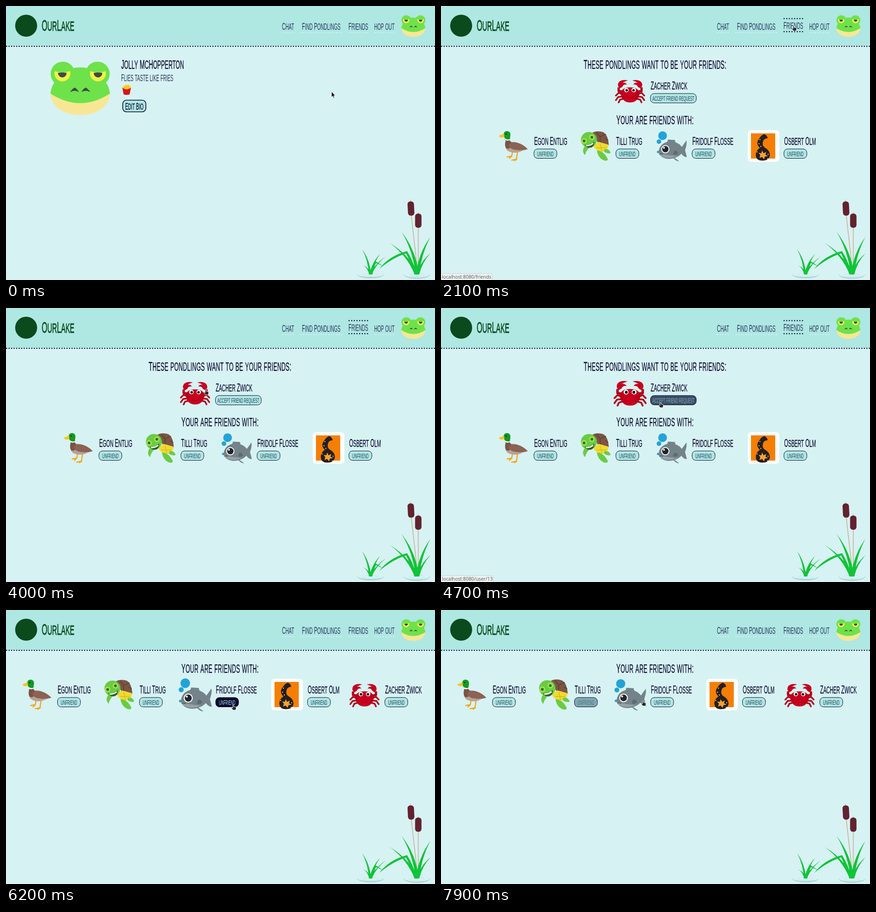
An HTML page for the animation above (8000 ms loop, 937 by 598 pixels).

```html
<!DOCTYPE html>
<html lang="en">
<head>
<meta charset="utf-8">
<title>OurLake</title>
<style>
  @property --zoom { syntax: "<number>"; inherits: true; initial-value: 0; }
  @property --tint { syntax: "<number>"; inherits: true; initial-value: 0; }

  :root { --navy: #07072f; --aqua: #afe7e2; --pale: #d7f2f3; }
  html, body { margin: 0; width: 100%; height: 100%; overflow: hidden; background: var(--pale); }
  svg { display: block; width: 937px; height: 598px; }

  text { font-family: "Liberation Sans", Arial, sans-serif; fill: #24345a; }
  .bold { fill: var(--navy); stroke: var(--navy); stroke-width: .25; }
  .title { letter-spacing: .022em; }
  .brand { fill: #0b4a1c; stroke: #0b4a1c; stroke-width: .8; }
  .status text { font: 10.4px "Open Sans", sans-serif; fill: #555; }
  .dots { fill: none; stroke-linecap: round; stroke: var(--pale); }
  .dark { stroke: var(--navy); }

  .page, .status, .pointer, .friends, .friends .top, .card, .cursor {
    animation: 8s linear infinite;
  }
  .page, .pointer { visibility: hidden; animation-timing-function: step-end; }
  .profile { animation-name: profile; }
  .requests { animation-name: requests; }
  .accepted { animation-name: accepted; }
  @keyframes profile { 0% { visibility: visible } 22.5% { visibility: hidden } }
  @keyframes requests { 0% { visibility: hidden } 22.5% { visibility: visible } 73.75% { visibility: hidden } }
  @keyframes accepted { 0% { visibility: hidden } 73.75%, 100% { visibility: visible } }

  .friends { animation-name: lift; }
  .friends .top { animation-name: top; }
  .friends .low { stroke: color-mix(in srgb, var(--navy) calc(100% * var(--tint)), var(--pale)); }
  @keyframes lift {
    0%, 14.5% { --tint: 0; transform: none }
    19.5%, 73.75% { --tint: 1; transform: translateY(-2px) }
    77%, 100% { --tint: 0; transform: none }
  }
  @keyframes top { 0%, 22% { opacity: 0 } 26.25%, 73.75% { opacity: 1 } 77%, 100% { opacity: 0 } }

  .link { animation-name: link; }
  .user { animation-name: user; }
  @keyframes link { 0%, 14.9% { opacity: 0 } 15%, 36% { opacity: 1 } 39.5%, 100% { opacity: 0 } }
  @keyframes user { 0%, 53.7% { opacity: 0 } 53.8%, 60% { opacity: 1 } 63%, 100% { opacity: 0 } }

  .avatar { transform: scale(calc(1 + .1 * var(--zoom))); }
  .button rect { fill: color-mix(in srgb, var(--navy) calc(100% * var(--tint)), var(--aqua)); stroke: var(--navy); }
  .button text { fill: color-mix(in srgb, var(--aqua) calc(100% * var(--tint)), #24425f); }
  .asking { animation-name: asking; }
  .fishy { animation-name: fishy; }
  .shelly { animation-name: shelly; }
  @keyframes asking {
    0%, 51.25% { --zoom: 0; --tint: 0 }
    55%, 56.25% { --zoom: 1; --tint: 0 }
    58.75% { --zoom: 1; --tint: .68 }
    61.25%, 100% { --zoom: 1; --tint: 1 }
  }
  @keyframes fishy {
    0%, 73.75% { --zoom: 0; --tint: 0 }
    77.5%, 89.4% { --zoom: 1; --tint: 1 }
    91.25% { --zoom: 1; --tint: .5 }
    93.1% { --zoom: .5; --tint: 0 }
    95%, 96.9% { --zoom: 0; --tint: 0 }
    98.75% { --zoom: .5; --tint: 0 }
    100% { --zoom: .8; --tint: 0 }
  }
  @keyframes shelly {
    0%, 93% { --zoom: 0; --tint: 0 }
    96.5% { --zoom: .75; --tint: .75 }
    98.75% { --zoom: .28; --tint: .28 }
    100% { --zoom: .1; --tint: .1 }
  }

  .cursor { animation-name: move; animation-timing-function: ease-in-out; }
  @keyframes move {
    0%, 4% { transform: translate(711px, 187px) }
    15%, 33% { transform: translate(770px, 43px) }
    40%, 44% { transform: translate(493px, 127px) }
    50% { transform: translate(436px, 178px) }
    55% { transform: translate(440px, 202px) }
    58.75% { transform: translate(479px, 206px) }
    63.5%, 88.2% { transform: translate(496px, 207px) }
    95%, 96.25% { transform: translate(325px, 203px) }
    98.75% { transform: translate(441px, 198px) }
    100% { transform: translate(448px, 198px) }
  }
  .arrow { animation-name: arrow; }
  .hand { animation-name: hand; }
  .beam { animation-name: beam; }
  @keyframes arrow {
    0% { visibility: visible } 14.4% { visibility: hidden }
    34.5% { visibility: visible } 39% { visibility: hidden }
    45.5% { visibility: visible } 49.5% { visibility: hidden }
  }
  @keyframes hand {
    0% { visibility: hidden } 14.4% { visibility: visible }
    34.5% { visibility: hidden } 49.5%, 100% { visibility: visible }
  }
  @keyframes beam { 0% { visibility: hidden } 39% { visibility: visible } 45.5% { visibility: hidden } }
</style>
</head>
<body>
<svg id="stage" viewBox="0 0 937 598">
  <defs>
    <g id="eye">
      <circle cx="27" cy="27" r="26.5" fill="#6ee24a"/>
      <path d="M9.5 21Q26 27 43 21A17.5 17.5 0 1 1 9.5 21Z" fill="#edf545"/>
      <path d="M16.5 25q9.5-2 19 0a9.5 10 0 0 1-19 0" fill="#3f494c"/>
      <path d="M43 67Q47 60 53 57Q59 60 62 67Q53 61 43 67Z" fill="#3f494c"/>
    </g>
    <g id="frog">
      <path d="M0 68C0 97 27 117 65 117S130 97 130 68Z" fill="#f7e794"/>
      <path d="M0 70C2 55 8 42 22 32Q37 13 65 13T108 32C122 42 128 55 130 70Q65 112 0 70Z" fill="#6ee24a"/>
      <use href="#eye"/><use href="#eye" transform="translate(130) scale(-1 1)"/>
    </g>

    <g id="duck">
      <g fill="none" stroke="#f5a51b" stroke-width="2.5" stroke-linecap="round" stroke-linejoin="round">
        <path d="M-2 11L-4 22L-14 24M-9 27L-4 22"/><path d="M9 12L6 29L-4 31M2 32L7 29"/>
      </g>
      <path d="M-17-12Q-21 5-12 11Q4 19 20 10L31 7Q15-8-8-10Z" fill="#b9a294"/>
      <path d="M-17-13L-9-14Q-6-7-2-6L-8 4Q-12 8-17 4Q-20-3-17-13Z" fill="#795345"/>
      <path d="M-11-2Q-5-11 9-7Q22-3 31 7Q19 10 8 9Q-8 8-11-2Z" fill="#8b6254"/>
      <path d="M-18-14Q-13-11-8-14" stroke="#fff" stroke-width="2" fill="none"/>
      <path d="M-22-25Q-21-33-14-32.500Q-6-32-7-23L-8-15Q-13-13-18-16Q-22-20-22-25Z" fill="#129a22"/>
      <path d="M-21-27Q-25-25-31-23Q-33-20-29-19Q-23-17-20-21Z" fill="#f8c51c"/>
      <circle cx="-16" cy="-26" r="1.3" fill="#111"/>
    </g>

    <g id="turtle">
      <path d="M-8-28Q0-34 14-31Q27-28 29-2Q18 2 8-3Z" fill="#7b5645"/>
      <path d="M2-30L10-20L10-7M10-20L23-26M21-16L28-12" stroke="#55382b" fill="none" stroke-width="1.3"/>
      <path d="M-5 0L7-9L28-3Q28 10 15 13Q1 12-5 0Z" fill="#f2d92f"/>
      <path d="M2 4L24 4M10-5L14 12" stroke="#b9b52b" fill="none"/>
      <path d="M-24 1L-14 4Q-20 9-23 20Q-31 12-24 1ZM3 10Q18 10 27 29Q26 34 17 31Q5 25 3 10ZM19 7Q30 5 33 15Q29 18 19 13Z" fill="#69cc42"/>
      <ellipse cx="-14.5" cy="-13.5" rx="17.500" ry="17" fill="#69cc42"/>
      <g fill="#a4e34c"><circle cx="-25" cy="-11" r="6"/><circle cx="-8" cy="-19" r="6"/></g>
      <circle cx="-25" cy="-11" r="3" fill="#346a2b"/><circle cx="-8" cy="-19" r="3" fill="#346a2b"/>
      <path d="M-24-3Q-11 0-3-10Q-2 4-14 4Q-21 3-24-3Z" fill="#315f27"/>
      <path d="M-21-1Q-12 0-5-6" stroke="#fff" stroke-width="2.5" fill="none"/>
    </g>

    <g id="fish">
      <g fill="#22a3d8"><circle cx="-20" cy="-22.5" r="9.5"/><circle cx="-28" cy="-9.5" r="5"/><circle cx="-30" cy="13" r="2.5"/></g>
      <path d="M-10-9L-8-14L7-13L8-8Q17-5 22 2L32-12Q34-5 29 9L33 24Q27 25 21 17Q14 24 6 26L16 33Q10 34 4 27Q-20 32-29 15Q-28-4-10-9Z" fill="#748389"/>
      <path d="M-29 15Q-14 20 12 22Q-18 33-29 15Z" fill="#94a3a8"/>
      <path d="M5 11Q11 9 14 16Q9 21 3 18" fill="#5d6c72"/>
      <circle cx="-14" cy="7" r="9" fill="#fff"/><circle cx="-14" cy="7" r="7" fill="#202629"/><circle cx="-17" cy="4" r="2" fill="#fff"/>
      <path d="M-27 18Q-22 16-19 19" stroke="#47545a" stroke-width="1.5" fill="none"/>
    </g>

    <g id="eel">
      <rect x="-34.5" y="-34.5" width="69" height="69" rx="7" fill="#fff"/>
      <rect x="-27.5" y="-27.5" width="53" height="55" fill="#f57f05"/>
      <path d="M9-17Q8-23 2-26Q-5-24-9-17Q-15-10-13-3Q-11 2-8 4Q-17 10-17 20Q-16 32-3 32Q13 32 14 19Q13 9 2 3Q-4-2-1-10Q0-16 9-17Z" fill="#241f20"/>
      <path d="M-3 10L0 16L6 13L4 19L10 22L3 23L1 29L-3 24L-9 26L-7 20L-11 15L-5 16Z" fill="#f5a32e"/>
      <path d="M-8-15v2M-10-6v2M-6 0v2M-14 12v2M10 17v2M9 27v2" stroke="#ffe08a" stroke-width="2"/>
    </g>

    <g id="crabSide">
      <path d="M15 9L25 5L31 11M15 13L26 14L31 21M12 17L22 20L25 26" fill="none" stroke="#b40019" stroke-width="3.5" stroke-linejoin="round" stroke-linecap="round"/>
      <path d="M14 3L25 1L25-7" fill="none" stroke="#b40019" stroke-width="5" stroke-linejoin="round"/>
      <path d="M22-5Q30-11 24-19Q17-25 5-22Q12-20 17-17Q10-18 7-13Q15-14 17-8Z" fill="#c7001e"/>
      <circle cx="8" cy="-1" r="4.8" fill="#fff"/><circle cx="7.500" cy="-.5" r="2.8" fill="#111"/>
    </g>
    <g id="crab">
      <path d="M-21 5Q-17-7 0-7T21 5Q18 26 0 26T-21 5Z" fill="#c7001e"/>
      <use href="#crabSide"/><use href="#crabSide" transform="scale(-1 1)"/>
      <path d="M-7 16Q0 19 7 16" stroke="#8d0012" fill="none"/>
    </g>
  </defs>
</svg>
<script>
  const CONDENSED = 0.48;
  const SMALL_CAP = 0.92;
  const DOT = 2.74;

  const caps = (text, size) => text.replace(/[a-z]+/g,
    run => `<tspan font-size="${size * SMALL_CAP}">${run.toUpperCase()}</tspan>`);

  const label = (x, y, size, text, style = '', anchor = 'start') =>
    `<text class="${style}" font-size="${size}" text-anchor="${anchor}"
      transform="translate(${x} ${y}) scale(${CONDENSED} 1)">${caps(text, size)}</text>`;

  const title = (y, text) => label(467.5, y, 28, text, 'bold title', 'middle');

  // Dots sit flush with both ends, like a dotted CSS border.
  const dots = (x1, x2, y, style = '') => {
    const span = x2 - x1 - DOT;
    const gap = span / Math.round(span / (2 * DOT));
    return `<path class="dots ${style}" stroke-width="${DOT}" stroke-dasharray="0 ${gap}"
      d="M${x1 + DOT / 2} ${y}h${span + .1}"/>`;
  };

  const navItem = (x1, x2, text) =>
    label((x1 + x2) / 2, 52, 22, text, '', 'middle') + dots(x1, x2, 58, 'low');

  const frog = (x, y, scale) => `<use href="#frog" transform="translate(${x} ${y}) scale(${scale})"/>`;

  const card = (x, y, animal, name, action = 'Unfriend', hover = '') => {
    const width = action === 'Unfriend' ? 50 : 100;
    return `<g class="card ${hover}" transform="translate(${x} ${y})">
      <g transform="translate(-45)"><use class="avatar" href="#${animal}"/></g>
      ${label(0, -2.5, 23.5, name, 'bold')}
      <g class="button"><rect x="-.5" y="6.5" width="${width}" height="20.5" rx="8"/>
      ${label(width / 2 - .5, 22.7, 15.5, action, '', 'middle')}</g></g>`;
  };

  const friends = (dx, y, hover = {}) => [
    [203.5, 'duck', 'Egon Entlig'],
    [382.5, 'turtle', 'Tilli Trug'],
    [549, 'fish', 'Fridolf Flosse'],
    [749.5, 'eel', 'Osbert Olm'],
  ].map(([x, animal, name]) => card(x + dx, y, animal, name, 'Unfriend', hover[animal])).join('');

  const blade = (x, cx, cy, tipX, tipY, w) =>
    `M${x - w} 586Q${cx - w} ${cy} ${tipX} ${tipY}Q${cx + w} ${cy} ${x + w} 586Z`;

  const cattail = (x, y, turn) =>
    `<g transform="translate(${x} ${y}) rotate(${turn})" fill="#62222f">
      <path d="M0-19v6" stroke="#c9b79c" stroke-width="1.5"/><rect x="-7" y="-15.5" width="14" height="31" rx="6"/></g>`;

  const ripple = (x, ry) => `<path d="M${x - 28.5} 586A28.5 ${ry} 0 0 0 ${x + 28.5} 586A28.5 ${ry + 2} 0 0 1 ${x - 28.5} 586Z"
      fill="#a5d3d5" stroke="#a5d3d5" stroke-width=".7"/>
    <ellipse cx="${x}" cy="587" rx="17" ry="${ry / 2}" fill="none" stroke="#c3e6e7"/>`;

  const status = (style, width, address) =>
    `<g class="status ${style}"><rect x="-1" y="584" width="${width}" height="16" rx="2" fill="#eef4f3" stroke="#bfd0cf"/>
      <text x="2" y="595">${address}</text></g>`;

  const header = `
    <rect width="937" height="87" fill="#afe7e2"/>
    ${dots(0, 937, 88, 'dark')}
    <circle cx="44" cy="43" r="24" fill="#0b4a1c"/>
    ${label(78, 54, 33, 'OurLake', 'brand')}
    ${navItem(603, 629, 'Chat')}
    ${navItem(643, 734, 'Find Pondlings')}
    <g class="friends">${navItem(748, 791, 'Friends')}${dots(748, 791, 29.5, 'dark top')}</g>
    ${navItem(805, 848, 'hop out')}
    ${frog(863.5, 20, .404)}`;

  const plants = `
    ${ripple(796, 6)}${ripple(897.5, 7)}
    <path d="M885 456L898 570M900.5 483V570" stroke="#c9b79c" stroke-width="1.8"/>
    ${cattail(884.5, 442, -3)}${cattail(900.5, 468.5, 0)}
    <path fill="#0fc437" d="${blade(898, 893, 535, 864, 493, 3.5)}${blade(896, 880, 545, 838, 517, 3.5)}
      ${blade(899, 904, 540, 927, 504, 3.5)}${blade(900, 907, 558, 927, 540, 2.5)}
      M892 586Q884 560 874 540Q845 549 815 574Q837 545 876 535Q889 556 898 586Z
      ${blade(795, 793, 555, 778, 531, 2.2)}${blade(796, 801, 560, 817, 541, 2.2)}
      ${blade(795, 792, 572, 780, 566, 1.8)}${blade(797, 806, 564, 829, 547, 1.8)}
      M796 586Q801 568 807 557L824 568L808 561Q803 572 800 586Z"/>`;

  const profile = `
    ${frog(97, 121, 1)}
    ${label(251.5, 137, 27.5, 'Jolly McHopperton', 'bold')}
    ${label(251.5, 164, 21.5, 'Flies taste like fries')}
    <path d="M255 179L257 173L260 175L262 171L265 173L268 171L270 175L273 174L272 184H256Z" fill="#ffd91c"/>
    <path d="M259 175V181M263 173V182M267 173V182" stroke="#e09b10"/>
    <path d="M254 178Q263 186 273 178L270 193Q263 195 257 193Z" fill="#d8121f"/>
    <rect x="255" y="205.5" width="50.5" height="25.5" rx="8" fill="#afe7e2" stroke="#07072f" stroke-width="1.6"/>
    ${label(280.25, 225.5, 20.5, 'Edit Bio', 'bold', 'middle')}`;

  const requests = `
    ${title(137, 'These pondlings want to be your friends:')}
    ${card(458, 184.5, 'crab', 'Zacher Zwick', 'Accept Friend Request', 'asking')}
    ${title(258, 'Your are friends with:')}
    ${friends(0, 305.5)}`;

  const accepted = `
    ${title(137, 'Your are friends with:')}
    ${friends(-90.5, 184.5, { turtle: 'shelly', fish: 'fishy' })}
    ${card(828, 184.5, 'crab', 'Zacher Zwick')}`;

  const cursor = `<g class="cursor">
    <path class="pointer arrow" d="M0 0V12L2.7 9.5L4.7 13.7L6.5 12.9L4.7 8.8H8.3Z" fill="#111" stroke="#fff" stroke-width=".8"/>
    <path class="pointer hand" d="M-1 1Q0-1 1.5 1V4Q3 3 4 4.5Q5.5 4 6.5 5.5V9L5 11.5H0L-4 7Q-3 5-1 7Z" fill="#292929" stroke="#fff" stroke-width=".9"/>
    <path class="pointer beam" d="M-2-7Q0-7 0-5V5Q0 7-2 7M2-7Q0-7 0-5M0 5Q0 7 2 7" fill="none" stroke="#222"/>
  </g>`;

  const page = (name, content) => `<g class="page ${name}">${content}</g>`;

  document.getElementById('stage').insertAdjacentHTML('beforeend',
    header + plants
    + page('profile', profile) + page('requests', requests) + page('accepted', accepted)
    + status('link', 113, 'localhost:8080/friends') + status('user', 115, 'localhost:8080/user/13')
    + cursor);
</script>
</body>
</html>
```
